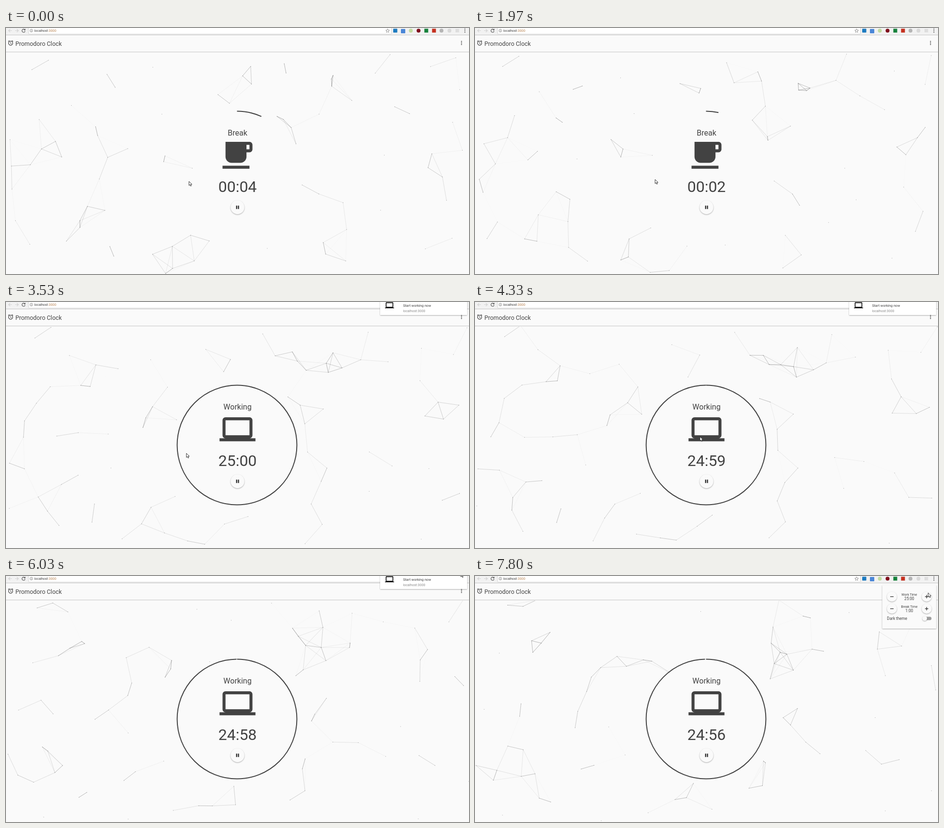
Recreate the animation shown at these times as an HTML page with a canvas. Size 959 by 510 pixels, loop 8000 ms.

```html
<!DOCTYPE html>
<html lang="en">
<head>
<meta charset="utf-8">
<title>Promodoro Clock</title>
<style>
  html, body { margin: 0; width: 100%; height: 100%; overflow: hidden; background: #fafafa; }
  canvas, svg { position: absolute; left: 0; top: 0; width: 959px; height: 510px; }
  text { font-family: Roboto, sans-serif; fill: #424242; }
  .mid { text-anchor: middle; }
  .raised { fill: #fafafa; filter: drop-shadow(0 1px 1.3px rgba(0, 0, 0, .32)); }
</style>
</head>
<body>
<canvas id="net" width="959" height="510"></canvas>
<svg viewBox="0 0 959 510">
  <defs>
    <path id="laptop" d="M20 18c1.1 0 2-.9 2-2V6c0-1.1-.9-2-2-2H4c-1.1 0-2 .9-2 2v10c0 1.1.9 2 2 2H0v2h24v-2h-4zM4 6h16v10H4V6z"/>
    <g id="more"><circle cy="-3.2" r="1"/><circle r="1"/><circle cy="3.2" r="1"/></g>
    <g id="minus"><circle class="raised" r="10.3"/><path d="M-3.5 0h7" stroke="#222" stroke-width="1.2"/></g>
    <g id="plus"><use href="#minus"/><path d="M0-3.5v7" stroke="#222" stroke-width="1.2"/></g>
  </defs>

  <!-- Browser bar -->
  <rect width="959" height="14.5" fill="#f2f2f2"/>
  <path d="M0 14.5h959" stroke="#c4c4c4"/>
  <rect x="46.5" y="-4" width="752" height="16.5" rx="1.5" fill="#fff" stroke="#c8c8c8" stroke-width=".7"/>
  <g fill="none" stroke="#d0d0d0" stroke-width="1.1">
    <path d="M12 5.5H5.5M8.500 2.300L5.300 5.500l3.200 3.200M19 5.500h6.500M22.500 2.300l3.200 3.200-3.200 3.200"/>
    <path d="M39 3.600A3.300 3.300 0 1 0 39.600 6.500M39.700 1.700v2.600h-2.800" stroke="#555"/>
    <circle cx="52.500" cy="5.500" r="2.900" stroke="#666" stroke-width=".7"/>
    <path d="M52.500 5v2.200M52.500 3.500v.8" stroke="#666" stroke-width=".8"/>
  </g>
  <text x="58.700" y="8" font-size="6.900">localhost<tspan fill="#b98350">:3000</tspan></text>
  <path d="M790.500 1.800l1.100 2.500 2.700.3-2 1.800.6 2.700-2.400-1.400-2.400 1.400.6-2.700-2-1.800 2.700-.3z" fill="none" stroke="#666" stroke-width=".7"/>
  <rect x="802" y="1.500" width="8.500" height="8" rx="1" fill="#1c7bc0"/>
  <rect x="818" y="2" width="9" height="9" rx="1" fill="#4b87d8"/>
  <circle cx="838.500" cy="5.500" r="4" fill="#c2dca0"/>
  <circle cx="854.500" cy="5.500" r="4" fill="#80101c"/>
  <rect x="866.500" y="1.500" width="8" height="8" fill="#14813a"/>
  <rect x="882.500" y="1.500" width="8" height="8" fill="#c5301f"/>
  <circle cx="902" cy="5.500" r="4" fill="#b5b5b5"/>
  <circle cx="918.500" cy="5.500" r="4" fill="#d9d9d9"/>
  <rect x="931" y="2" width="7.500" height="7" fill="#dedede"/>
  <use href="#more" x="950.500" y="5.500" fill="#555"/>

  <!-- App bar -->
  <rect y="15" width="959" height="34" fill="#fafafa"/>
  <path d="M0 49.500h959" stroke="#d2d2d2"/><path d="M0 50.500h959" stroke="#ededed"/>
  <path transform="translate(3.300 24.600) scale(.53)" fill="#333" d="M22 5.720l-4.600-3.860-1.290 1.530 4.600 3.860L22 5.720zM7.880 3.390L6.600 1.860 2 5.710l1.290 1.530 4.590-3.850zM12.500 8H11v6l4.750 2.850.750-1.230-4-2.370V8zM12 4c-4.970 0-9 4.030-9 9s4.020 9 9 9c4.970 0 9-4.030 9-9s-4.030-9-9-9zm0 16c-3.870 0-7-3.130-7-7s3.130-7 7-7 7 3.130 7 7-3.130 7-7 7z"/>
  <text x="19.400" y="37.200" font-size="12.400">Promodoro Clock</text>
  <use href="#more" x="943.500" y="31" fill="#333"/>

  <!-- Timer -->
  <circle id="ring" cx="478.500" cy="296.600" r="124" pathLength="1" fill="none" stroke="#424242" stroke-width="2" transform="rotate(-90 478.500 296.600)"/>
  <text id="mode" class="mid" x="479.500" y="222.800" font-size="16"></text>
  <g transform="translate(442.300 226.700) scale(3.100)" fill="#424242">
    <path id="cup" d="M20 3H4v10c0 2.210 1.790 4 4 4h6c2.210 0 4-1.790 4-4v-3h2c1.110 0 2-.9 2-2V5c0-1.110-.890-2-2-2zm0 5h-2V5h2v3zM2 21h18v-2H2v2z"/>
    <use id="work" href="#laptop"/>
  </g>
  <text id="clock" class="mid" x="479.500" y="339.500" font-size="32"></text>
  <circle class="raised" cx="479.500" cy="371.800" r="14.200"/>
  <path d="M477.700 368.300v7M481.500 368.300v7" stroke="#222" stroke-width="2.200"/>

  <g id="notice">
    <rect class="raised" x="775" y="-10" width="180" height="37" style="fill:#fff"/>
    <use href="#laptop" transform="translate(785 -2.500) scale(.78)"/>
    <text x="822.500" y="9.600" font-size="7.200">Start working now</text>
    <text x="822.500" y="20.600" font-size="7" style="fill:#8a8a8a">localhost:3000</text>
  </g>

  <g id="menu">
    <rect class="raised" x="843.500" y="19" width="112" height="90" rx="1"/>
    <use href="#minus" x="863.500" y="42.800"/><use href="#plus" x="935.500" y="42.800"/>
    <use href="#minus" x="863.500" y="67.800"/><use href="#plus" x="935.500" y="67.800"/>
    <g class="mid">
      <text x="899.500" y="41" font-size="6.800">Work Time</text><text x="899.500" y="50.300" font-size="8.200">25:00</text>
      <text x="899.500" y="66" font-size="6.800">Break Time</text><text x="899.500" y="75.300" font-size="8.200">1:00</text>
    </g>
    <text x="853.300" y="91" font-size="8.200">Dark theme</text>
    <rect x="927" y="84.500" width="18.500" height="7" rx="3.500" fill="#9e9e9e"/>
    <circle class="raised" cx="931.500" cy="88" r="4.800"/>
  </g>

  <path id="cursor" d="M0 0v8.500l2-1.900 1.400 3.200 1.500-.7-1.400-3H6.200z" fill="#fff" stroke="#222" stroke-width=".9"/>
</svg>

<script>
const LOOP = 8000, WIDTH = 959, HEIGHT = 510, TOP = 49;
const DOTS = 80, REACH = 70, SPEED = 15;
const $ = id => document.getElementById(id);
const ctx = $("net").getContext("2d");

// The screen runs smoothly at first, stalls, then refreshes about five times a second.
function heldTime(ms) {
  if (ms < 170) return 0;
  if (ms < 1970) return Math.min(ms, 1000);
  return 1970 + Math.floor((ms - 1970) / 210) * 210;
}

let seed = 29;
const random = () => (seed = seed * 16807 % 2147483647) / 2147483647;
const between = (low, high) => low + (high - low) * random();
const gap = (a, b) => Math.hypot(a.x - b.x, a.y - b.y);

// Bounce a straight path off both ends of a range.
function fold(value, low, high) {
  const span = high - low, turn = 2 * span;
  const m = ((value - low) % turn + turn) % turn;
  return low + (m > span ? turn - m : m);
}

// Dots are scattered clear of the timer and drift from there, before and after mid-loop.
const dots = [];
while (dots.length < DOTS) {
  const dot = {
    x: between(0, WIDTH), y: between(TOP, HEIGHT),
    vx: between(-SPEED, SPEED), vy: between(-SPEED, SPEED)
  };
  const clear = gap(dot, { x: 478, y: 297 }) > 135 && dots.every(other => gap(dot, other) > 18);
  if (clear) dots.push(dot);
}

function drawNet(seconds) {
  const points = dots.map(({ x, y, vx, vy }) => ({
    x: fold(x + vx * seconds, 0, WIDTH),
    y: fold(y + vy * seconds, TOP, HEIGHT)
  }));
  ctx.clearRect(0, 0, WIDTH, HEIGHT);
  ctx.lineWidth = .65;
  ctx.fillStyle = "rgba(60,60,60,.5)";
  points.forEach((p, i) => {
    ctx.fillRect(p.x - .5, p.y - .5, 1, 1);
    for (const q of points.slice(i + 1)) {
      const distance = gap(p, q);
      if (distance >= REACH) continue;
      ctx.strokeStyle = `rgba(40,40,40,${.7 * (1 - distance / REACH)})`;
      ctx.beginPath();
      ctx.moveTo(p.x, p.y);
      ctx.lineTo(q.x, q.y);
      ctx.stroke();
    }
  });
}

// Pointer stops: time, x, y.
const stops = [
  [0, 379, 318], [700, 373, 314], [3400, 373, 314], [4200, 466, 279.5], [4500, 466, 279.5],
  [5100, 895, 7], [5900, 942, -7], [7500, 938.5, 35], [LOOP, 938.5, 35]
];
function pointerAt(ms) {
  const i = stops.findIndex(stop => stop[0] > ms);
  const [t0, x0, y0] = stops[i - 1], [t1, x1, y1] = stops[i];
  const k = (ms - t0) / (t1 - t0), ease = k * k * (3 - 2 * k);
  return [x0 + (x1 - x0) * ease, y0 + (y1 - y0) * ease];
}

// Four seconds of break remain, then a 25 minute session begins.
const isWork = tick => tick >= 4;
const secondsLeft = tick => isWork(tick) ? 1504 - tick : 4 - tick;
const share = tick => secondsLeft(tick) / (isWork(tick) ? 1500 : 60);
const twoDigits = n => String(n).padStart(2, "0");
const show = (id, on) => $(id).style.display = on ? "" : "none";

function drawTimer(ms) {
  const elapsed = ms + 880, tick = Math.floor(elapsed / 1000), left = secondsLeft(tick);
  const ease = Math.min(1, elapsed % 1000 / 300);
  const before = share(Math.max(0, tick - 1));
  $("ring").setAttribute("stroke-dasharray", `${before + (share(tick) - before) * ease} 2`);
  $("mode").textContent = isWork(tick) ? "Working" : "Break";
  $("clock").textContent = `${twoDigits(Math.floor(left / 60))}:${twoDigits(left % 60)}`;
  show("cup", !isWork(tick));
  show("work", isWork(tick));
  show("notice", isWork(tick) && ms < 6300);
  show("menu", ms >= 7200);
}

function render(now) {
  const ms = heldTime(now % LOOP);
  drawNet((ms - LOOP / 2) / 1000);
  drawTimer(ms);
  $("cursor").setAttribute("transform", `translate(${pointerAt(ms)})`);
}

const start = performance.now();
function loop() {
  render(performance.now() - start);
  requestAnimationFrame(loop);
}
loop();
</script>
</body>
</html>
```
